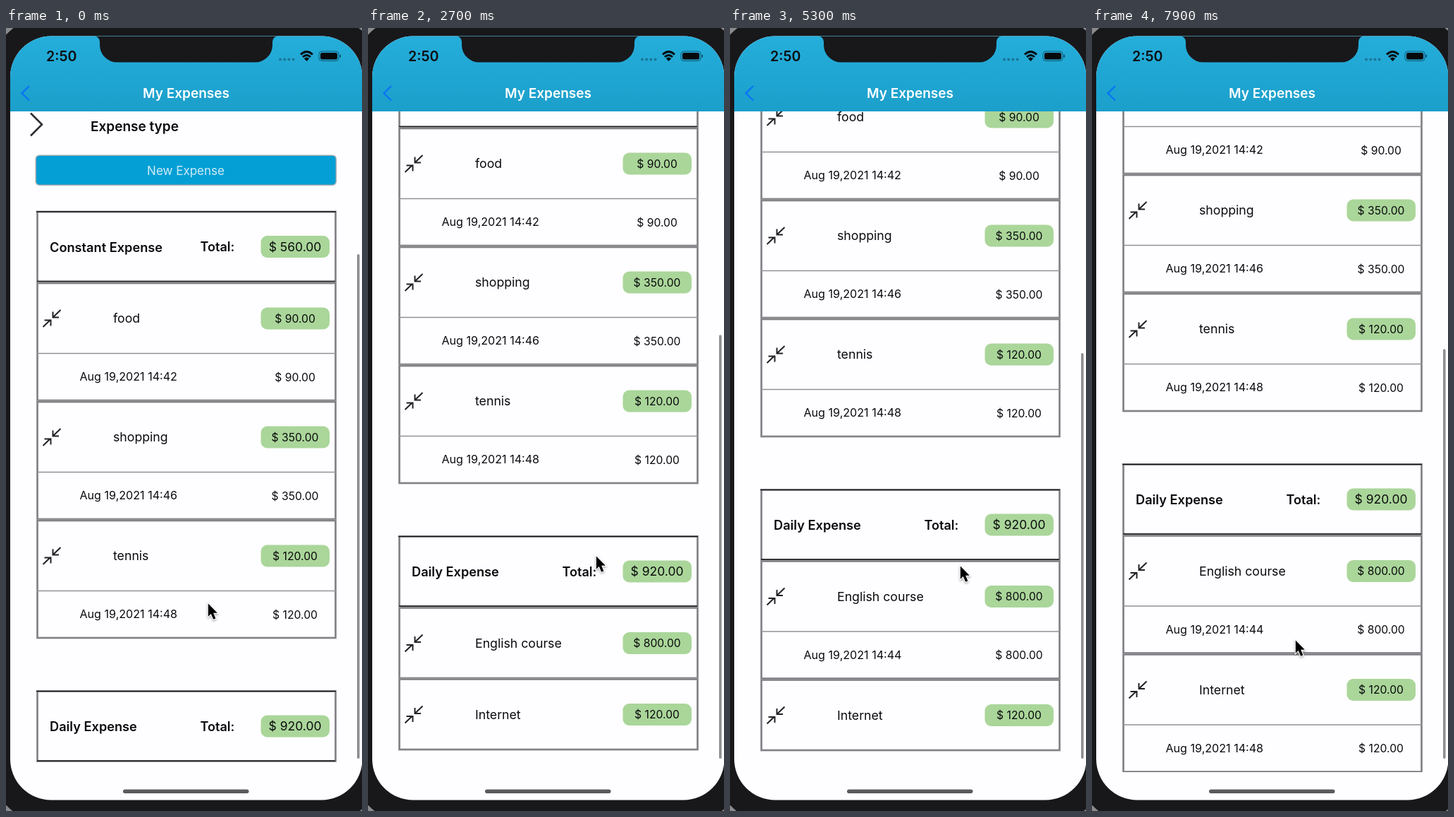
Write an HTML page with a canvas that moves like this. It is 505 px wide and 1108 px high and loops after 8 s.

```html
<!DOCTYPE html>
<html lang="en">
<head>
<meta charset="utf-8">
<title>My Expenses</title>
<style>
html, body { margin: 0; width: 100%; height: 100%; overflow: hidden; background: #18181b; }
canvas { display: block; }
</style>
</head>
<body>
<canvas id="stage" width="505" height="1108"></canvas>
<script>
const c = document.getElementById('stage').getContext('2d');
const LOOP = 8000, STEP = 100;
const VIEW_TOP = 118, VIEW_BOTTOM = 1053;
const INK = '#0b0b0d', PAPER = '#fefdff', GREEN = '#aad69a', GREY = '#929196';

// Times at which the lower table and its rows unfold
const OPEN_DAILY = 800, OPEN_COURSE = 4000, OPEN_INTERNET = 6300;

const constantRows = [
  ['food', '$ 90.00', 'Aug 19,2021 14:42', 0],
  ['shopping', '$ 350.00', 'Aug 19,2021 14:46', 0],
  ['tennis', '$ 120.00', 'Aug 19,2021 14:48', 0]
];
const dailyRows = [
  ['English course', '$ 800.00', 'Aug 19,2021 14:44', OPEN_COURSE],
  ['Internet', '$ 120.00', 'Aug 19,2021 14:48', OPEN_INTERNET]
];

// [time, value...], eased from one key to the next
const scrollKeys = [
  [0, 0], [400, 16], [1000, 16], [2000, -187.5], [2600, -219], [2900, -219], [3400, -187.5],
  [4700, -187.5], [5300, -285], [5900, -255], [6400, -255], [7000, -374], [7200, -374], [7800, -321]
];
const cursorKeys = [
  [0, 286, 813], [200, 286, 810], [800, 300, 962], [1000, 302, 962], [2000, 305, 761],
  [2600, 323, 746], [2900, 323, 746], [3900, 322, 890], [4200, 322, 845], [4400, 322, 842],
  [4700, 322, 842], [5300, 326, 760], [6000, 307, 961], [6400, 308, 964], [7000, 327, 779],
  [7200, 327, 779], [7900, 288, 865]
];

function sample(keys, t) {
  const i = keys.findIndex(k => k[0] > t);
  if (i < 0) return keys[keys.length - 1].slice(1);
  const a = keys[i - 1], b = keys[i];
  const u = (t - a[0]) / (b[0] - a[0]), e = u * u * (3 - 2 * u);
  return a.slice(1).map((v, n) => v + (b[n + 1] - v) * e);
}

function box(x, y, w, h, r, fill) {
  c.beginPath();
  c.roundRect(x, y, w, h, r);
  c.fillStyle = fill;
  c.fill();
}

function stroke(path, width, color) {
  c.lineWidth = width;
  c.strokeStyle = color;
  c.stroke(new Path2D(path));
}

function text(str, x, middle, size, weight = 400, align = 'left', color = INK) {
  c.font = `${weight} ${size}px Inter, sans-serif`;
  c.textAlign = align;
  c.fillStyle = color;
  c.fillText(str, x, middle + size * 0.36);
}

function amount(str, middle, size, pill) {
  if (pill) box(361.5, middle - 15.5, 97.5, 31, 9, GREEN);
  text(str, 410, middle, size, 400, 'center');
}

function frame(top, bottom) {
  const path = `M44.5 ${top}V${bottom}H467.5V${top}Z`;
  stroke(path, 3.2, '#aaa9ae');
  stroke(path, 1.4, '#77767b');
}

function arrows(y) {
  c.save();
  c.translate(65, y);
  stroke('M12.5 -12L2 -2M1.5 -9.5V-1.5H10M-12.5 12L-2 2M-10.5 2.5H-1.5V10.5', 2, '#222226');
  c.restore();
}

function table(title, total, top, rows, t) {
  frame(top, top + 99);
  stroke(`M43 ${top}H468M44 ${top + 98.5}H467`, 1.6, '#161619');
  text(title, 62, top + 50, 18.2, 600);
  text('Total:', 275.5, top + 50, 18, 600);
  amount(total, top + 49.5, 17.5, true);
  let y = top + 101;
  for (const [name, sum, date, opens] of rows) {
    const open = t >= opens;
    frame(y, y + (open ? 166 : 99.5));
    arrows(y + 50);
    text(name, 152, y + 50, 17.7);
    amount(sum, y + 50, 15.7, true);
    if (open) {
      stroke(`M44 ${y + 99.5}H468`, 1.5, GREY);
      text(date, 104.5, y + 132.5, 16.1);
      amount(sum, y + 133, 15.7, false);
    }
    y += open ? 168 : 101;
  }
}

function scrollbar(t, scroll) {
  const extra = t < OPEN_DAILY ? 0 : t < 4700 ? 203.5 : t < 6500 ? 271 : 337;
  const content = 1300 + extra, left = scroll - 16 + extra;
  const length = 949000 / content + Math.min(0, left);
  const bottom = 1034 - Math.max(0, left) * 920 / content;
  box(498, bottom - length, 3.6, length, 1.8, '#8f8e93');
}

function list(t) {
  const [scroll] = sample(scrollKeys, t);
  c.save();
  c.beginPath();
  c.rect(6, VIEW_TOP, 499, VIEW_BOTTOM - VIEW_TOP);
  c.clip();
  c.save();
  c.translate(0, scroll);
  stroke('M35 120.5L51 136.5L35 152.5', 2.5, '#2c2c30');
  text('Expense type', 120, 139.5, 19, 600);
  box(41.5, 179.5, 427.5, 43.5, 6, '#a3abb0');
  box(43, 181, 424.5, 40.5, 4.5, '#039fd5');
  text('New Expense', 255, 201.5, 17, 400, 'center', '#cfebf6');
  table('Constant Expense', '$ 560.00', 260, constantRows, t);
  table('Daily Expense', '$ 920.00', 938.5, t < OPEN_DAILY ? [] : dailyRows, t);
  c.restore();
  scrollbar(t, scroll);
  c.restore();
}

function header() {
  const sky = c.createLinearGradient(0, 11, 0, VIEW_TOP);
  sky.addColorStop(0, '#25aedb');
  sky.addColorStop(1, '#1b9fcb');
  c.fillStyle = sky;
  c.fillRect(6, 11, 499, VIEW_TOP - 11);
  c.fillStyle = '#18181b';
  c.fill(new Path2D('M125 11.5A8 8 0 0 1 133 19.5V24A24.5 24.5 0 0 0 157.5 48.5H353.5A24.5 24.5 0 0 0 378 24V19.5A8 8 0 0 1 386 11.5Z'));
  text('2:50', 57, 40, 19.6, 600);
  for (let i = 0; i < 4; i++) box(387 + i * 6.2, 42.5, 4, 4, 2, 'rgba(20,70,95,.5)');
  stroke('M418 37.5Q426.5 29.5 435 37.5M421 41Q426.5 36 432 41', 2.8, '#08090b');
  c.fillStyle = '#08090b';
  c.fill(new Path2D('M426.5 47L422.8 43.2Q426.5 40 430.2 43.2Z'));
  c.beginPath();
  c.roundRect(444, 33, 28, 13.5, 4);
  c.lineWidth = 1;
  c.strokeStyle = 'rgba(0,20,30,.55)';
  c.stroke();
  box(446, 35, 24, 9.5, 2.5, '#08090b');
  box(473.2, 37.5, 1.8, 4.5, 1, 'rgba(0,20,30,.55)');
  stroke('M33 82L22.5 92.3L33 102.5', 2.4, '#0a74f5');
  text('My Expenses', 255.5, 92.5, 19, 600, 'center', '#fff');
}

function cursor(t) {
  c.save();
  c.translate(...sample(cursorKeys, t));
  c.translate(0.8, 1.5);
  c.scale(0.93, 0.93);
  const shape = new Path2D('M0 0V19.5L4.3 15.6L7.8 24L11.4 22.5L7.9 14.3H14Z');
  c.shadowColor = 'rgba(0,0,0,.35)';
  c.shadowBlur = 3;
  c.shadowOffsetY = 1.5;
  c.lineWidth = 2.4;
  c.strokeStyle = '#fff';
  c.stroke(shape);
  c.shadowColor = 'transparent';
  c.fillStyle = '#000';
  c.fill(shape);
  c.restore();
}

function draw(now) {
  const t = Math.floor(now % LOOP / STEP) * STEP;
  c.fillStyle = '#8b8b8d';
  c.fillRect(0, 0, 505, 1108);
  box(-20, -16, 551, 1141, 78, '#18181b');
  c.save();
  c.beginPath();
  c.roundRect(6, 11.5, 499.5, 1081, 58);
  c.clip();
  c.fillStyle = PAPER;
  c.fillRect(6, 11, 500, 1082);
  list(t);
  header();
  box(166, 1077.5, 178.5, 5.5, 2.7, '#5a595e');
  c.restore();
  cursor(t);
  requestAnimationFrame(() => draw(performance.now()));
}
draw(0);
</script>
</body>
</html>
```
